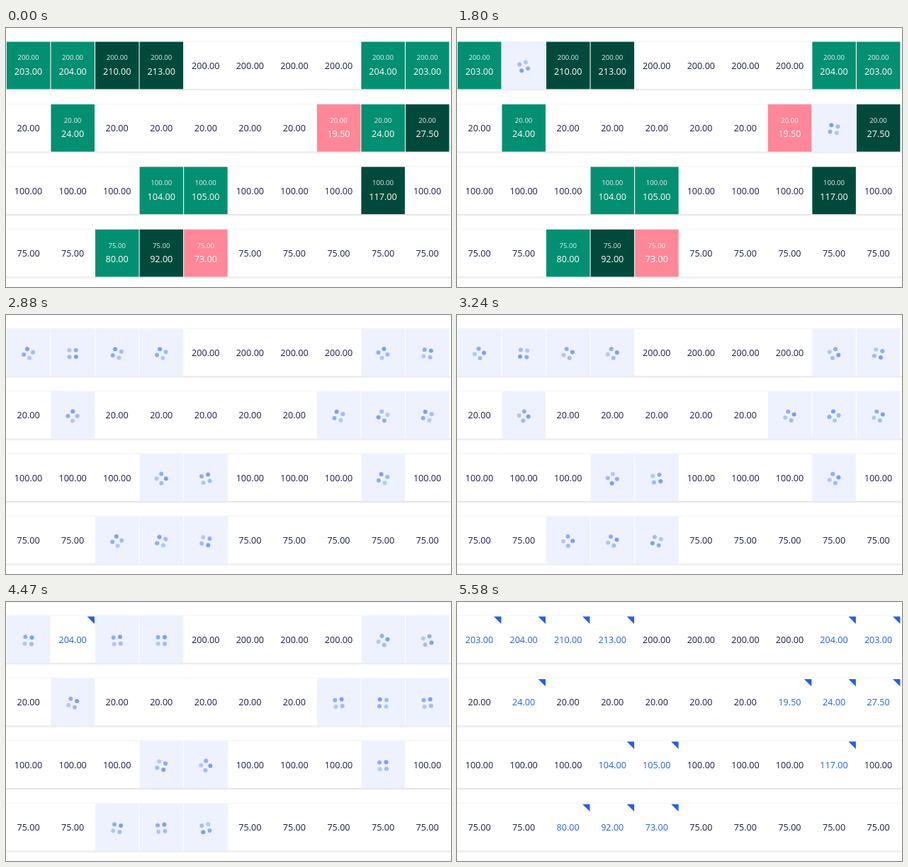
An HTML page with a canvas for the animation above (7200 ms loop, 628 px wide and 366 px high).

```html
<!DOCTYPE html>
<html lang="en">
<head>
<meta charset="utf-8">
<title>Price grid update</title>
<style>
  html, body { margin: 0; width: 100%; height: 100%; overflow: hidden; background: #fff; }
  canvas { display: block; }
</style>
</head>
<body>
<canvas id="stage" width="628" height="366"></canvas>
<script>
const ctx = document.getElementById('stage').getContext('2d');

const LOOP = 7200, STEP = 30;
const FIRST_SAVE = 900, LAST_SAVE = 2850, SAVE_TIME = 2850, ALL_SAVED = 5580;
const SPIN_PERIOD = 1350, SPIN_START = 236;
const CELL = { x: 0.9, y: 19.5, w: 61.5, h: 66.8, dx: 62.56, dy: 88.4 };
const INK = '#191d48', BLUE = '#245eee', LOADING = '#eef2fe';
const GREEN = '#038f72', DARK_GREEN = '#014a3b', PINK = '#ff8798';
// clockwise, starting at the darkest dot
const DOTS = ['#7d9cfd', '#a2b9fe', '#b2c6fe', '#90abfd'];

const COLUMNS = [...'ABCDEFGHIJ'];
const basePrices = [200, 20, 100, 75];
// new prices by cell, in the order they are saved
const edits = {
  B1: 204, I2: 24, E4: 73, D3: 104, J1: 203, E3: 105, I1: 204, B2: 24,
  C4: 80, A1: 203, D1: 213, I3: 117, C1: 210, D4: 92, H2: 19.5, J2: 27.5
};
const saveOrder = Object.keys(edits);

// saves come one by one at first, then nearly all together
function saveStart(rank) {
  const left = (1 - rank / (saveOrder.length - 1)) ** 2.1 / (1 + 0.605 * rank);
  return LAST_SAVE - (LAST_SAVE - FIRST_SAVE) * left;
}

function rect(x, y, w, h, color) {
  ctx.fillStyle = color;
  ctx.fillRect(x, y, w, h);
}

function label(value, x, baseline, size, color, weight = 400) {
  ctx.font = `${weight} ${size}px "Open Sans", "Noto Sans", sans-serif`;
  ctx.fillStyle = color;
  ctx.fillText(value.toFixed(2), x, baseline);
}

function rowFrame(y) {
  rect(0, y - 1, 628, 1, '#f4f4f5');
  ['#dfdfe2', '#ebebed', '#f8f8f9'].forEach((color, i) =>
    rect(0, y + CELL.h + i, 628, 1, color));
}

function toneOf(change) {
  if (change < 0) return PINK;
  return change > 5 ? DARK_GREEN : GREEN;
}

function spinner(cx, cy, elapsed) {
  DOTS.forEach((color, i) => {
    const angle = (SPIN_START + i * 90 + elapsed / SPIN_PERIOD * 360) * Math.PI / 180;
    ctx.fillStyle = color;
    ctx.beginPath();
    ctx.arc(cx + 6.6 * Math.cos(angle), cy + 6.6 * Math.sin(angle), 3, 0, Math.PI * 2);
    ctx.fill();
  });
}

function flag(right, top) {
  const size = 10.4;
  ctx.fillStyle = BLUE;
  ctx.beginPath();
  ctx.moveTo(right - size, top);
  ctx.lineTo(right, top);
  ctx.lineTo(right, top + size);
  ctx.fill();
}

function cell(x, y, price, name, t) {
  const cx = x + CELL.w / 2 - 0.1;
  const newPrice = edits[name];
  if (!newPrice) return label(price, cx, y + 38.4, 12.6, INK, 500);

  const start = saveStart(saveOrder.indexOf(name));
  if (t < start) {
    rect(x, y, CELL.w, CELL.h, toneOf(newPrice - price));
    label(price, cx, y + 25.8, 9.6, 'rgba(255,255,255,.92)');
    label(newPrice, cx, y + 46.5, 12.6, '#fff');
  } else if (t < Math.min(start + SAVE_TIME, ALL_SAVED)) {
    rect(x, y, CELL.w, CELL.h, LOADING);
    spinner(cx, y + 34.9, t - start);
  } else {
    label(newPrice, cx, y + 38.4, 12.6, BLUE, 500);
    flag(x + CELL.w, y + 1);
  }
}

function draw(t) {
  rect(0, 0, 628, 366, '#fff');
  ctx.textAlign = 'center';
  rowFrame(CELL.y - CELL.dy);
  basePrices.forEach((price, r) => {
    const y = CELL.y + r * CELL.dy;
    rowFrame(y);
    COLUMNS.forEach((letter, c) =>
      cell(CELL.x + c * CELL.dx, y, price, letter + (r + 1), t));
  });
}

const begin = performance.now();
function tick() {
  const t = (performance.now() - begin) % LOOP;
  draw(Math.floor(t / STEP) * STEP);
  requestAnimationFrame(tick);
}
tick();
</script>
</body>
</html>
```
